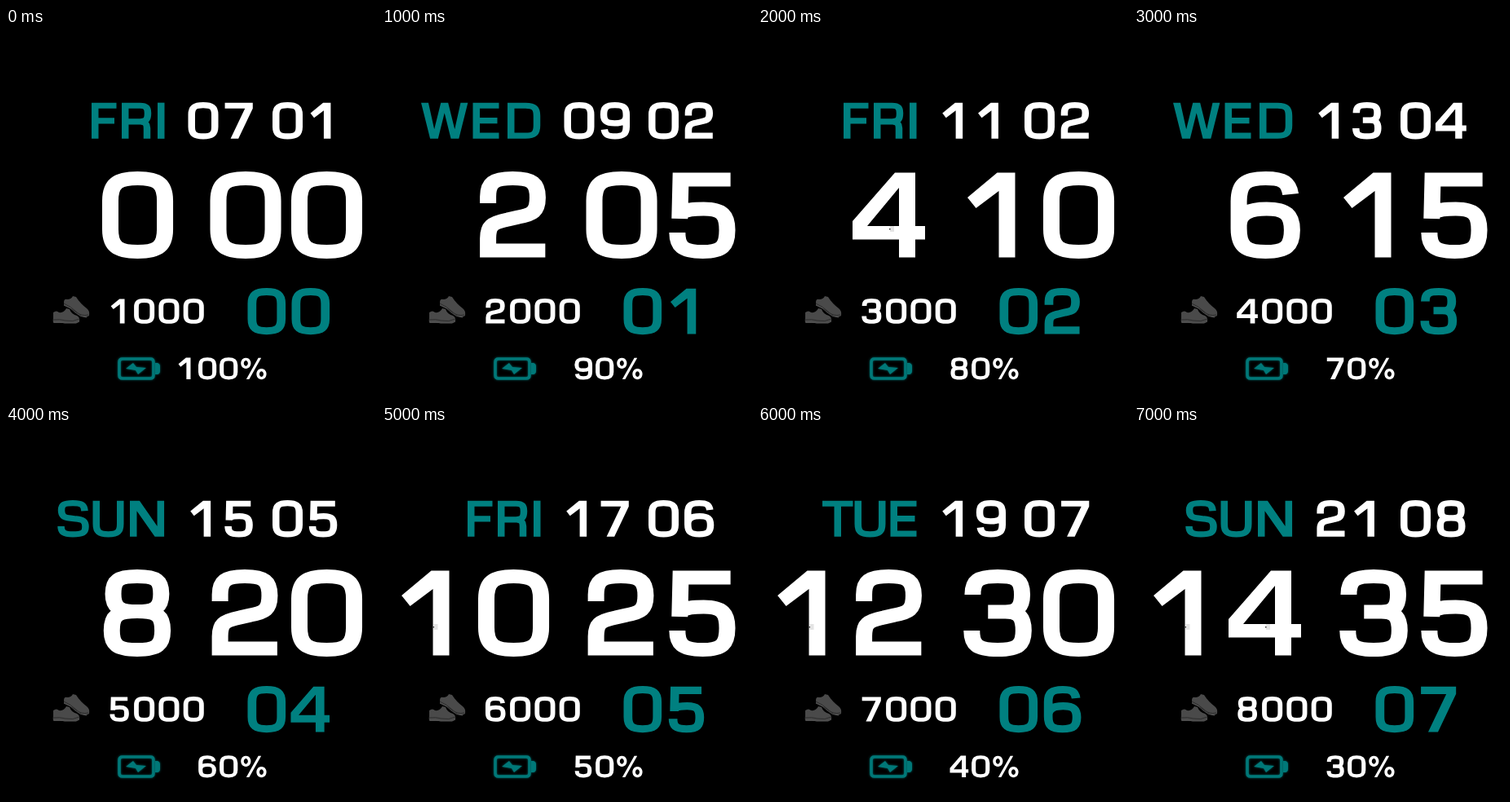
Animation, 454 px wide and 454 px high, one loop 8000 ms. Source, as an HTML page with a canvas:

```html
<!DOCTYPE html>
<html lang="en">
<head>
<meta charset="utf-8">
<title>Watch face</title>
<style>
  html, body { margin: 0; width: 100%; height: 100%; overflow: hidden; background: #000; }
  canvas { display: block; }
</style>
</head>
<body>
<canvas id="face" width="454" height="454" role="img"></canvas>
<script>
const canvas = document.getElementById('face');
const ctx = canvas.getContext('2d');
const TEAL = '#008080', WHITE = '#fff';

// Wide square lettering, 107 units high. Stroked glyphs are widened
// so that their uprights come out heavier than their bars.
const WIDEN = 20 / 17;
const strokes = {
  0: 'M37 8.5C58 8.5 65.5 15 65.5 36V71C65.5 92 58 98.5 37 98.5C16 98.5 8.5 92 8.5 71V36C8.5 15 16 8.5 37 8.5Z',
  2: 'M10.3 39V31C10.3 14 16 8.5 36 8.5C56 8.5 62 14 62 32C62 50 56 53 42 56L31 59C14 63 10.3 67 10.3 82V97H70',
  3: 'M11 31C11 13 17 8.5 37 8.5C57 8.5 62.5 13 62.5 31C62.5 47 57 52 45 52H27M45 52C59 52 64 58 64 75C64 93 58 98.5 37 98.5C16 98.5 10 93 10 75',
  5: 'M66 10H14L13 58M13.5 51C20 46.5 28 46 38 46C57 46 62.5 53 62.5 72C62.5 92 57 98.5 37 98.5C16 98.5 10.5 92 10.5 75',
  6: 'M63 28C61 13 55 8.5 37 8.5C16 8.5 9 15 9 37V70C9 92 16 98.5 37 98.5C58 98.5 64.5 92 64.5 72C64.5 53 58 46 38 46C21 46 9 51 9 66',
  8: 'M36.5 8.5C56 8.5 61.5 13 61.5 30C61.5 46 56 51.5 36.5 51.5C17 51.5 11.5 46 11.5 30C11.5 13 17 8.5 36.5 8.5ZM36.5 51.5C58 51.5 63 57 63 75C63 93 57 98.5 36.5 98.5C16 98.5 10 93 10 75C10 57 15 51.5 36.5 51.5Z',
  9: 'M11 79C13 94 19 98.5 37 98.5C58 98.5 65 92 65 70V37C65 15 58 8.5 37 8.5C16 8.5 9.5 15 9.5 35C9.5 54 16 61 36 61C53 61 65 56 65 41',
  D: 'M8.5 10H44C66 10 72 18 72 40V67C72 89 66 97 44 97H8.5Z',
  E: 'M64 10H8.5V97H64M8.5 53H60',
  F: 'M8.5 105.5V10H61M8.5 54H56',
  I: 'M8.5 1.5V105.5',
  R: 'M8.5 105.5V10H45C60 10 64 16 64 32C64 50 60 56 45 56H8.5M48 57C59 58 62 63 62 75V105.5',
  S: 'M67 31C66 13 60 8.5 38 8.5C16 8.5 10 13 10 29C10 46 16 50 32 52L45 54C63 56 69 60 69 77C69 94 62 98.5 38 98.5C16 98.5 9 93 9 75',
  T: 'M0 10H75M37.5 10V105.5',
  U: 'M8.5 1.5V68C8.5 91 15 98.5 38 98.5C61 98.5 67.5 91 67.5 68V1.5'
};
const fills = {
  1: 'M6.5 32L43 1.5H65V105.5H45V24L17 45Z',
  4: 'M50 1.5H75V67H87V83.5H75V105.5H55V83.5H-2V61ZM55 20L16 67H55Z',
  7: 'M3 1.5H83.5V18L42 105.5H19.5L61 18.5H3Z',
  N: 'M0 1.5H28L79 75V1.5H99V105.5H72L20 31V105.5H0Z',
  W: 'M0 1.5H21L38 78L57 1.5H78L97 78L114 1.5H135L109 105.5H86L67.5 31L49 105.5H26Z',
  '%': 'M24 2a24 26 0 1 0 .01 0ZM24 15a10 13 0 1 0 .01 0ZM99 54a24 26 0 1 0 .01 0ZM99 67a10 13 0 1 0 .01 0ZM84 2H98L40 105H26Z'
};
const toPaths = set => Object.fromEntries(
  Object.entries(set).map(([key, d]) => [key, new Path2D(d)]));
const strokePaths = toPaths(strokes), fillPaths = toPaths(fills);

function glyph(ch, x, y, size, color) {
  ctx.save();
  ctx.translate(x, y);
  ctx.scale(size, size);
  ctx.fillStyle = ctx.strokeStyle = color;
  ctx.lineWidth = 17;
  if (fillPaths[ch]) {
    ctx.fill(fillPaths[ch], 'evenodd');
  } else {
    ctx.scale(WIDEN, 1);
    ctx.stroke(strokePaths[ch]);
  }
  ctx.restore();
}

function text(str, x, y, size, pitch, color = WHITE) {
  [...str].forEach((ch, i) => glyph(ch, x + i * pitch, y, size, color));
}

function shape(d, fill, stroke, width = 1) {
  const path = new Path2D(d);
  if (fill) { ctx.fillStyle = fill; ctx.fill(path); }
  if (stroke) { ctx.strokeStyle = stroke; ctx.lineWidth = width; ctx.stroke(path); }
}

function shoes() {
  const body = '#4a4a4a', sole = '#555', seam = '#2c2c2c';
  shape('M71 337Q71 332 75 333Q80 333 82 329L86 330Q91 338 99 344Q103 347 102 353L98 355Q89 353 83 346L71 340Z', body);
  shape('M71 338Q80 342 86 348Q92 354 101 352', null, seam);
  shape('M71 340Q80 343 85 349Q91 355 99 355', null, sole);
  shape('M58 349Q62 346 65 349Q71 350 74 344L78 345Q80 351 87 353Q91 355 90 360L86 362H59Q57 361 58 356Z', body);
  shape('M58 358Q66 357 73 359Q82 361 90 357', null, seam);
  shape('M58 361Q66 360 72 362H86L90 360', null, sole);
}

function battery() {
  ctx.save();
  ctx.shadowColor = '#006060';
  ctx.shadowBlur = 3;
  shape('M143 406H177Q181 406 181 410V426Q181 430 177 430H143Q139 430 139 426V410Q139 406 143 406Z', null, '#007878', 3.6);
  shape('M183 411H186Q189 412 189 415V421Q189 424 186 425H183Z', '#007878');
  shape('M147 418L156 411L160 416L172 417L162 425L159 420Z', '#007878');
  ctx.restore();
}

function smudge(x) {
  ctx.fillStyle = '#e4e4e4';
  ctx.fillRect(x, 243, 5, 7);
  ctx.fillStyle = '#333';
  ctx.fillRect(x - 1, 246, 1.5, 1.5);
}

const letterX = {
  FRI: [105, 142, 186],
  WED: [48, 111.5, 154],
  SUN: [63, 106.5, 152],
  TUE: [79, 118.5, 162.5]
};
const days = ['FRI', 'WED', 'FRI', 'WED', 'SUN', 'FRI', 'TUE', 'SUN'];
const months = [1, 2, 2, 4, 5, 6, 7, 8];
const two = n => String(n).padStart(2, '0');

function draw(step) {
  const day = days[step];
  const date = two(7 + 2 * step), month = two(months[step]);
  const hour = String(2 * step), minute = two(5 * step), second = two(step);
  const count = String(1000 * (step + 1)), charge = `${100 - 10 * step}%`;

  ctx.fillStyle = '#000';
  ctx.fillRect(0, 0, 454, 454);

  [...day].forEach((ch, i) => glyph(ch, letterX[day][i], 91, 0.425, TEAL));
  text(date, 223.5, 91, 0.425, 43.8);
  text(month, 327, 91, 0.425, 43.8);

  text(hour, 118 - 100.5 * (hour.length - 1), 176, 1, 100.5);
  if (hour.length > 1) smudge(63.5);
  if (hour.endsWith('4')) smudge(162);
  text(minute, 250.5, 176, 1, 99.5);
  text(second, 296.5, 319, 0.535, 54, TEAL);

  shoes();
  text(count, 126.8, 332, 0.288, 30.3);
  battery();
  text(charge, 288.2 - 26.1 * (charge.length - 1), 404.2, 0.255, 26.1);

  canvas.setAttribute('aria-label',
    `${day} ${date} ${month}, ${hour}:${minute}:${second}, ${count} steps, battery ${charge}`);
}

const start = performance.now();
let shown = -1;
function tick() {
  const step = Math.floor((performance.now() - start) / 1000) % 8;
  if (step !== shown) draw(shown = step);
  requestAnimationFrame(tick);
}
tick();
</script>
</body>
</html>
```
